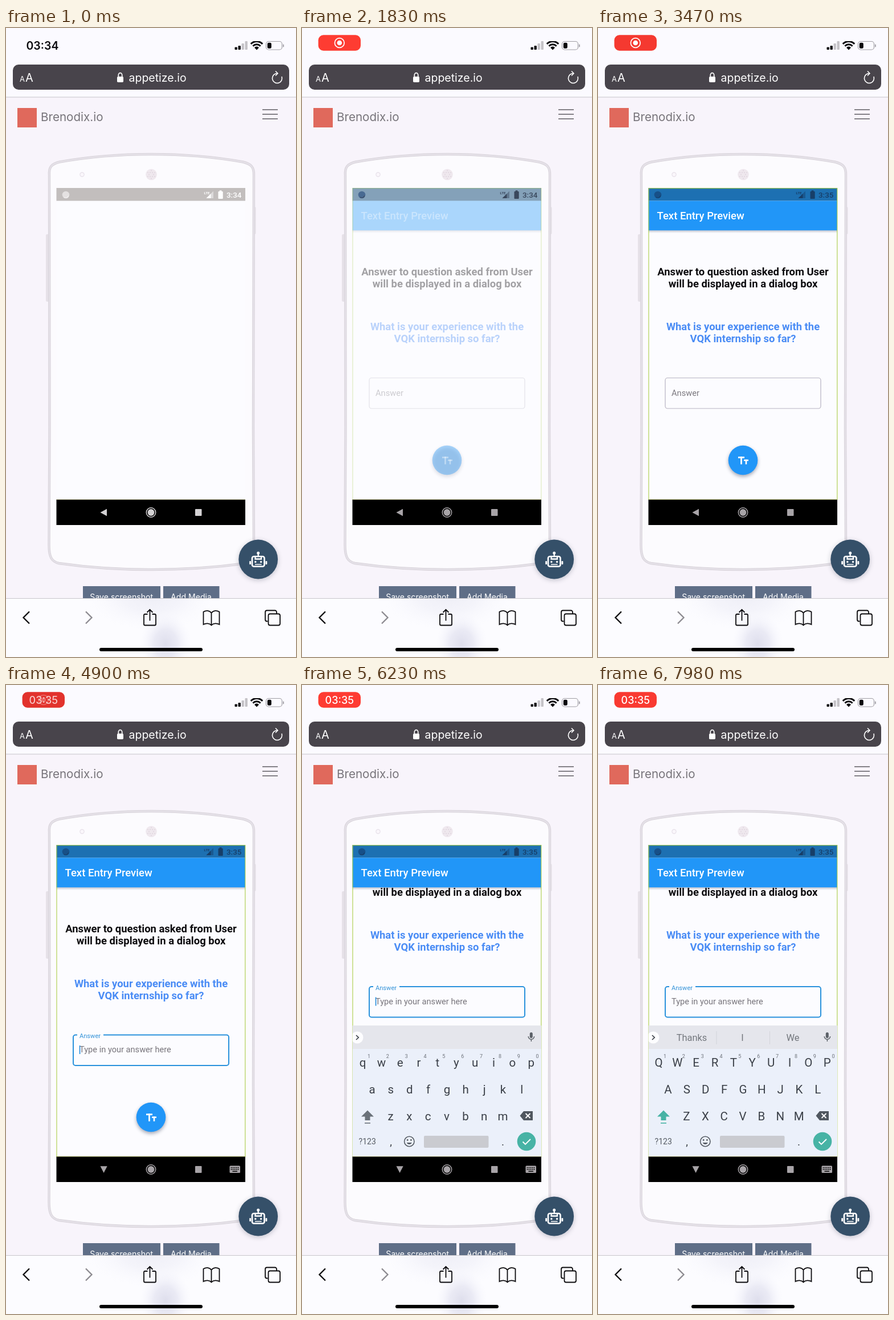
Write an HTML page with a canvas that moves like this. It is 509 px wide and 1101 px high and loops after 8000 ms.

```html
<!DOCTYPE html>
<html lang="en">
<head>
<meta charset="utf-8">
<title>Mobile app preview</title>
<style>
html, body { margin: 0; width: 100%; height: 100%; overflow: hidden; background: #f8f4fb; }
canvas { display: block; width: 509px; height: 1101px; }
</style>
</head>
<body>
<canvas id="stage"></canvas>
<script>
const W = 509, H = 1101, LOOP = 8000;
const cv = document.getElementById('stage');
const c = cv.getContext('2d');
const dpr = window.devicePixelRatio || 1;
cv.width = W * dpr;
cv.height = H * dpr;

const SANS = 'Inter, "Liberation Sans", sans-serif';
const APP = 'Roboto, "Noto Sans", sans-serif';
const BLUE = '#2196f8';

const clamp = v => Math.max(0, Math.min(1, v));
const ramp = (t, a, b) => clamp((t - a) / (b - a));
const ease = k => 1 - Math.pow(1 - k, 3);
const lerp = (a, b, k) => a + (b - a) * k;
const mix = (a, b, k) => `rgb(${a.map((v, i) => Math.round(lerp(v, b[i], k)))})`;

function box(x, y, w, h, color) {
  c.fillStyle = color;
  c.fillRect(x, y, w, h);
}
function rr(x, y, w, h, r, fill, stroke, lw = 1) {
  c.beginPath();
  c.roundRect(x, y, w, h, r);
  paint(fill, stroke, lw);
}
function disc(x, y, r, fill, stroke, lw = 1) {
  c.beginPath();
  c.arc(x, y, r, 0, 7);
  paint(fill, stroke, lw);
}
function poly(pts, fill, stroke, lw = 1) {
  c.beginPath();
  for (let i = 0; i < pts.length; i += 2) c.lineTo(pts[i], pts[i + 1]);
  if (fill) c.closePath();
  paint(fill, stroke, lw);
}
function path(d, fill, stroke, lw = 1) {
  const p = new Path2D(d);
  if (fill) { c.fillStyle = fill; c.fill(p); }
  if (stroke) { c.strokeStyle = stroke; c.lineWidth = lw; c.stroke(p); }
}
function paint(fill, stroke, lw) {
  if (fill) { c.fillStyle = fill; c.fill(); }
  if (stroke) { c.strokeStyle = stroke; c.lineWidth = lw; c.stroke(); }
}
function text(s, x, y, size, color, weight = 400, align = 'left', font = APP) {
  c.font = `${weight} ${size}px ${font}`;
  c.textAlign = align;
  c.fillStyle = color;
  c.fillText(s, x, y);
}
function clipped(x, y, w, h, fn) {
  c.save();
  c.beginPath();
  c.rect(x, y, w, h);
  c.clip();
  fn();
  c.restore();
}
function shadow(color, blur, dy) {
  c.shadowColor = color;
  c.shadowBlur = blur * dpr;
  c.shadowOffsetY = dy * dpr;
}

function statusBar(t) {
  const clock = 1 - ramp(t, 450, 620);
  if (clock > 0) {
    c.globalAlpha = clock;
    text('03:34', 35.5, 38, 19.5, '#0b0a0d', 600, 'left', SANS);
    c.globalAlpha = 1;
  }
  const pop = ease(ramp(t, 560, 960));
  if (pop > 0) {
    const pulse = 0.5 + 0.5 * Math.cos((t - 5000) / 2200 * 2 * Math.PI);
    const k = lerp(0.6, 1, pop);
    c.save();
    c.globalAlpha = pop;
    c.translate(65.8, 26);
    c.scale(k, k);
    rr(-37.2, -13.7, 74.4, 27.4, 9, mix([255, 60, 50], [225, 50, 44], pulse));
    const swap = ramp(t, 4650, 4990);
    c.globalAlpha = pop * (1 - swap);
    disc(0, 0, 8.4, null, '#fff', 1.7);
    disc(0, 0, 4.3, '#fff');
    c.globalAlpha = swap;
    text('03:35', 0, 6.8, 18, '#fff', 500, 'center', SANS);
    c.restore();
  }
  [4.5, 7, 11, 15].forEach((h, i) =>
    rr(401.5 + i * 6, 38 - h, 4.4, h, 1, i < 2 ? '#0b0a0d' : '#c4c2c7'));
  c.save();
  c.beginPath();
  c.moveTo(440, 38.5);
  c.lineTo(425, 23);
  c.lineTo(455, 23);
  c.clip();
  [14, 8.8].forEach(r => disc(440, 37.5, r, null, '#0b0a0d', 3));
  disc(440, 37.5, 5, '#0b0a0d');
  c.restore();
  rr(456.5, 23.5, 28, 14.5, 4.5, null, '#a09ea4', 1.2);
  rr(458.8, 25.8, 7, 10, 2.2, '#0b0a0d');
  rr(486, 28.5, 1.8, 5, 1, '#a09ea4');
}

function browser() {
  rr(12, 64, 485, 44, 10, '#48444b');
  text('A', 24, 94, 13, '#fff', 400, 'left', SANS);
  text('A', 34, 94, 20, '#fff', 400, 'left', SANS);
  rr(195, 85, 11, 10, 1.8, '#fff');
  path('M197.3 86V82.3a3.2 3.6 0 0 1 6.4 0V86', null, '#fff', 1.7);
  text('appetize.io', 215.5, 94, 19.5, '#fff', 400, 'left', SANS);
  c.beginPath();
  c.arc(476, 88, 8.5, -0.35, 4.75);
  paint(null, '#fff', 1.6);
  path('M473 75.5L477 79.5L473 83.5', null, '#fff', 1.6);
  box(0, 120.5, W, 1, '#c8c5c9');

  box(20, 140, 34, 34, '#e0695c');
  text('Brenodix.io', 61, 163, 20.6, '#77747a', 400, 'left', SANS);
  [143, 151, 159].forEach(y => box(450, y - 1, 27, 2, '#858288'));
}

function phoneBody() {
  rr(70, 361, 6, 118, 2, '#e6e1e8');
  rr(433, 313, 5.5, 48, 2, '#e6e1e8');
  const shell = 'M76 258C75 243 80 238 94 234.5Q170 221 255 221Q340 221 416 234.5C430 238 435.5 243 435 258' +
    'L434 700L435 905C435 927 430 935 417 937.5Q340 948 255 948Q170 948 93 937C80 934 75.5 926 75.5 905L76.5 700Z';
  path(shell, '#fcfbfe', '#d8d3da', 4.4);
  path(shell, null, '#e5e1e8', 2.4);
  disc(133.5, 256.5, 3.6, '#faf7fb', '#e6dfe8', 1.2);
  disc(255, 256.5, 9.8, '#efe8ee');
  for (let i = 0; i < 12; i++) {
    const a = i * Math.PI / 6, r = i % 2 ? 7 : 4;
    disc(255 + Math.cos(a) * r, 256.5 + Math.sin(a) * r, 1, '#e1d6df');
  }
}

function deviceStatus(t, show) {
  box(88.5, 280, 331.5, 22.5, mix([194, 190, 189], [29, 112, 178], show));
  const ink = show ? mix([80, 78, 86], [23, 62, 104], show) : '#fff';
  disc(105, 292, 6.3, show ? mix([104, 122, 152], [23, 80, 136], show) : '#e4e1e1');
  c.beginPath();
  c.arc(105, 292, 5, 0.3, 2.2);
  paint(null, show ? ink : '#f4f2f2', 1.2);
  text('LTE', 347.5, 290.5, 6.2, ink, 700);
  c.globalAlpha = 0.45;
  poly([351.5, 298, 364, 298, 364, 285.5], ink);
  c.globalAlpha = 1;
  poly([351.5, 298, 359.5, 298, 359.5, 290], ink);
  rr(372.5, 286, 8.2, 13, 1, ink);
  box(374.7, 284.3, 3.8, 2, ink);
  text(t < 3000 ? '3:34' : '3:35', 387, 297, 13.4, ink, 500);
}

function navBar(t, typing) {
  box(88.5, 825.5, 331.5, 44.5, '#000');
  box(88.5, 825, 331.5, 0.8, '#8f8d62');
  const g = mix([212, 210, 212], [168, 164, 168], ramp(t, 60, 600));
  poly(typing ? [165.5, 842.3, 177.7, 842.3, 171.6, 854] : [165.5, 848, 177, 841.8, 177, 854.2], g);
  disc(254.5, 848, 8.2, null, g, 1.5);
  disc(254.5, 848, 5.9, g);
  rr(332, 842, 11.5, 12, 1, g);
  if (!typing) return;
  rr(392.5, 841.5, 18.5, 12.5, 1.5, g);
  for (let r = 0; r < 2; r++)
    for (let i = 0; i < 5; i++) box(394.7 + i * 3, 844 + r * 3, 1.7, 1.7, '#000');
  box(397.5, 850.5, 8.5, 1.5, '#000');
}

function answerField(t) {
  const k = ease(ramp(t, 4640, 4820));
  const edge = mix([184, 180, 194], [42, 146, 220], k);
  const gap = k * 23;
  c.beginPath();
  c.moveTo(148 + gap, 612.5);
  c.arcTo(391, 612.5, 391, 666, 4);
  c.arcTo(391, 666, 118, 666, 4);
  c.arcTo(118, 666, 118, 612.5, 4);
  c.arcTo(118, 612.5, 148, 612.5, 4);
  c.lineTo(148 - gap, 612.5);
  paint(null, edge, lerp(1.2, 2, k));
  text('Answer', 129, lerp(644.2, 618, k), lerp(14.7, 11.1, k), mix([124, 121, 127], [50, 146, 216], k));
  if (!k) return;
  const base = c.globalAlpha;
  c.globalAlpha = base * k;
  text('Type in your answer here', 129, 643.3, 14.6, '#77747b');
  c.globalAlpha = base;
  const beat = (t < 5600 ? t - 4700 : t - 5000) % 1000;
  if (t > 4700 && beat < 500) box(128.7, 631, 1.7, 15, '#2a8fdc');
}

function page(t, rise) {
  c.save();
  c.translate(0, -84.5 * rise);
  const line = (s, y, color) => text(s, 254.5, y, 18.45, color, 700, 'center');
  line('Answer to question asked from User', 432.5, '#0c0b0e');
  line('will be displayed in a dialog box', 453.7, '#0c0b0e');
  line('What is your experience with the', 528.5, '#4a8cf5');
  line('VQK internship so far?', 549.7, '#4a8cf5');
  answerField(t);
  c.save();
  shadow('rgba(30,40,70,.4)', 6, 3);
  disc(254.5, 756.5, 25.8, BLUE);
  c.restore();
  box(246, 750.3, 11, 2.8, '#fff');
  box(250.1, 750.3, 2.8, 13.4, '#fff');
  box(256, 755.4, 8, 2.6, '#fff');
  box(258.7, 755.4, 2.6, 8.3, '#fff');
  c.restore();
}

function keyboard(caps) {
  const ink = '#3a3f47', teal = '#47b3a5', STEP = 32.85;
  box(88.5, 596, 331.5, 41, '#e5e6ec');
  box(88.5, 637, 331.5, 190, '#ebf0fa');
  clipped(88.5, 596, 332, 41, () => disc(97, 617, 10.5, '#fdfdff'));
  poly([95, 613, 99.2, 617, 95, 621], null, ink, 1.7);
  rr(399.8, 608, 5, 10, 2.5, '#5b6067');
  path('M397.2 615a5.2 5.2 0 0 0 10.4 0M402.4 620V624', null, '#5b6067', 1.5);
  if (caps) {
    [['Thanks', 164.5], ['I', 253.5], ['We', 342]].forEach(([s, x]) =>
      text(s, x, 623, 16.4, '#73777d', 400, 'center'));
    [207.5, 301].forEach(x => box(x, 606, 1, 23, '#d2d4d9'));
  }
  const rows = [['qwertyuiop', 106.5, 668], ['asdfghjkl', 123, 714.5], ['zxcvbnm', 155.5, 761.5]];
  rows.forEach(([keys, x, y], r) => [...keys].forEach((k, i) => {
    const kx = x + i * STEP;
    text(caps ? k.toUpperCase() : k, kx, y, 20.5, ink, 400, 'center');
    if (!r) text(String((i + 1) % 10), kx + 11, 653, 9, '#6d727a', 400, 'center');
  }));
  const sh = caps ? teal : '#6b727a';
  poly([115, 744.5, 126, 755.5, 119.5, 755.5, 119.5, 762, 110.5, 762, 110.5, 755.5, 104, 755.5], sh);
  box(110, 766, 10, 1.6, sh);
  poly([382.5, 754, 389, 746, 405, 746, 405, 762, 389, 762], '#50575f');
  path('M392.5 750L400.5 758M400.5 750L392.5 758', null, '#fff', 1.8);
  text('?123', 114.7, 804, 14, '#565c64', 400, 'center');
  text(',', 156, 806, 19, ink, 400, 'center');
  disc(188.3, 799, 8.7, null, '#565c64', 1.6);
  disc(185.2, 796.5, 1.4, '#565c64');
  disc(191.4, 796.5, 1.4, '#565c64');
  path('M183.8 801a4.9 4.9 0 0 0 9 0z', '#565c64');
  rr(214, 789, 113.5, 21, 2, '#cacbd0');
  text('.', 352.5, 806, 19, ink, 400, 'center');
  disc(394, 799, 16.3, teal);
  path('M387.5 799.5L392 804L401 795', null, '#fff', 1.9);
}

function device(t) {
  const show = ramp(t, 1680, 2080);
  const rise = ease(ramp(t, 5060, 5420));
  box(88.5, 280, 331.5, 590, '#fcfcff');
  deviceStatus(t, show);
  if (show) {
    c.globalAlpha = show;
    clipped(88.5, 354, 331.5, 471.5, () => {
      page(t, rise);
      const g = c.createLinearGradient(0, 354, 0, 359);
      g.addColorStop(0, 'rgba(40,50,80,.28)');
      g.addColorStop(1, 'rgba(40,50,80,0)');
      box(88.5, 354, 331.5, 5, g);
    });
    box(88.5, 302.5, 331.5, 51.7, BLUE);
    text('Text Entry Preview', 103.5, 335.3, 18.5, '#fff', 500);
    c.globalAlpha = show * 0.8;
    c.strokeStyle = '#a6cb3c';
    c.lineWidth = 1.3;
    c.strokeRect(89, 280.6, 330.8, 544.8);
    c.globalAlpha = 1;
  }
  if (rise) clipped(88.5, 354, 331.5, 471.5, () => {
    c.translate(0, 229.5 * (1 - rise));
    keyboard(t >= 6500);
  });
  navBar(t, t >= 4800);
}

function helper() {
  c.save();
  shadow('rgba(30,40,60,.25)', 8, 2);
  disc(442.7, 930, 34.4, '#355069');
  c.restore();
  rr(432, 925, 21.5, 17.5, 3, null, '#fff', 2.7);
  path('M442.7 918V925M437.5 925V929.5H448V925', null, '#fff', 2.3);
  disc(442.7, 919, 2.5, '#fff');
  [437.8, 447.6].forEach(x => disc(x, 934.5, 1.7, '#fff'));
  box(437, 938.2, 11.5, 1.5, '#fff');
  rr(427.2, 933, 2.8, 6, 1, '#fff');
  rr(455.5, 933, 2.8, 6, 1, '#fff');
}

function toolbar() {
  box(135, 977, 136, 24, '#5f6e87');
  box(276, 977, 98.5, 24, '#5f6e87');
  text('Save screenshot', 202.7, 1001, 14.1, '#fff', 400, 'center', SANS);
  text('Add Media', 325, 1001, 14.1, '#fff', 400, 'center', SANS);
  box(0, 998, W, 103, '#fcfcff');
  clipped(0, 999, W, 102, () => {
    [[255, 995, 1.9, 60, .45], [280, 1078, .8, 56, 1]].forEach(([x, y, sx, r, a]) => {
      c.save();
      c.translate(x, y);
      c.scale(sx, 1);
      const g = c.createRadialGradient(0, 0, 0, 0, 0, r);
      g.addColorStop(0, `rgba(222,222,236,${a})`);
      g.addColorStop(.45, `rgba(228,228,241,${a * .75})`);
      g.addColorStop(1, 'rgba(245,245,253,0)');
      box(-r, -r, 2 * r, 2 * r, g);
      c.restore();
    });
  });
  box(0, 998, W, 1, '#c9c7cb');
  const ink = '#0b0a0d';
  poly([41, 1021.5, 30.5, 1032, 41, 1042.5], null, ink, 2.3);
  poly([140, 1021.5, 150.5, 1032, 140, 1042.5], null, '#8c8a90', 2.3);
  path('M248.5 1026H244a2 2 0 0 0-2 2V1043.500a2 2 0 0 0 2 2H261a2 2 0 0 0 2-2V1028a2 2 0 0 0-2-2H256.500', null, ink, 1.8);
  path('M252.500 1037.500V1018.500M247.500 1023L252.500 1018L257.500 1023', null, ink, 1.8);
  path('M360.500 1024C357 1019.500 351 1019 346.500 1022V1044C351 1041.500 357 1041.500 360.500 1045.500' +
    'C364 1041.500 370 1041.500 374.500 1044V1022C370 1019 364 1019.500 360.500 1024V1045', null, ink, 1.8);
  path('M459.500 1038.500H458a3 3 0 0 1-3-3V1022.500a3 3 0 0 1 3-3H472a3 3 0 0 1 3 3V1025', null, ink, 1.8);
  rr(460.5, 1025.5, 20.5, 20, 3, '#fcfcff', ink, 1.8);
  rr(164, 1085, 181, 6, 3, '#000');
}

function draw(t) {
  c.setTransform(dpr, 0, 0, dpr, 0, 0);
  c.lineCap = 'butt';
  box(0, 0, W, H, '#f8f4fb');
  box(0, 0, W, 121, '#fbfaff');
  statusBar(t);
  browser();
  phoneBody();
  device(t);
  helper();
  toolbar();
}

const start = performance.now();
function tick() {
  draw((performance.now() - start) % LOOP);
  requestAnimationFrame(tick);
}
tick();
</script>
</body>
</html>
```
